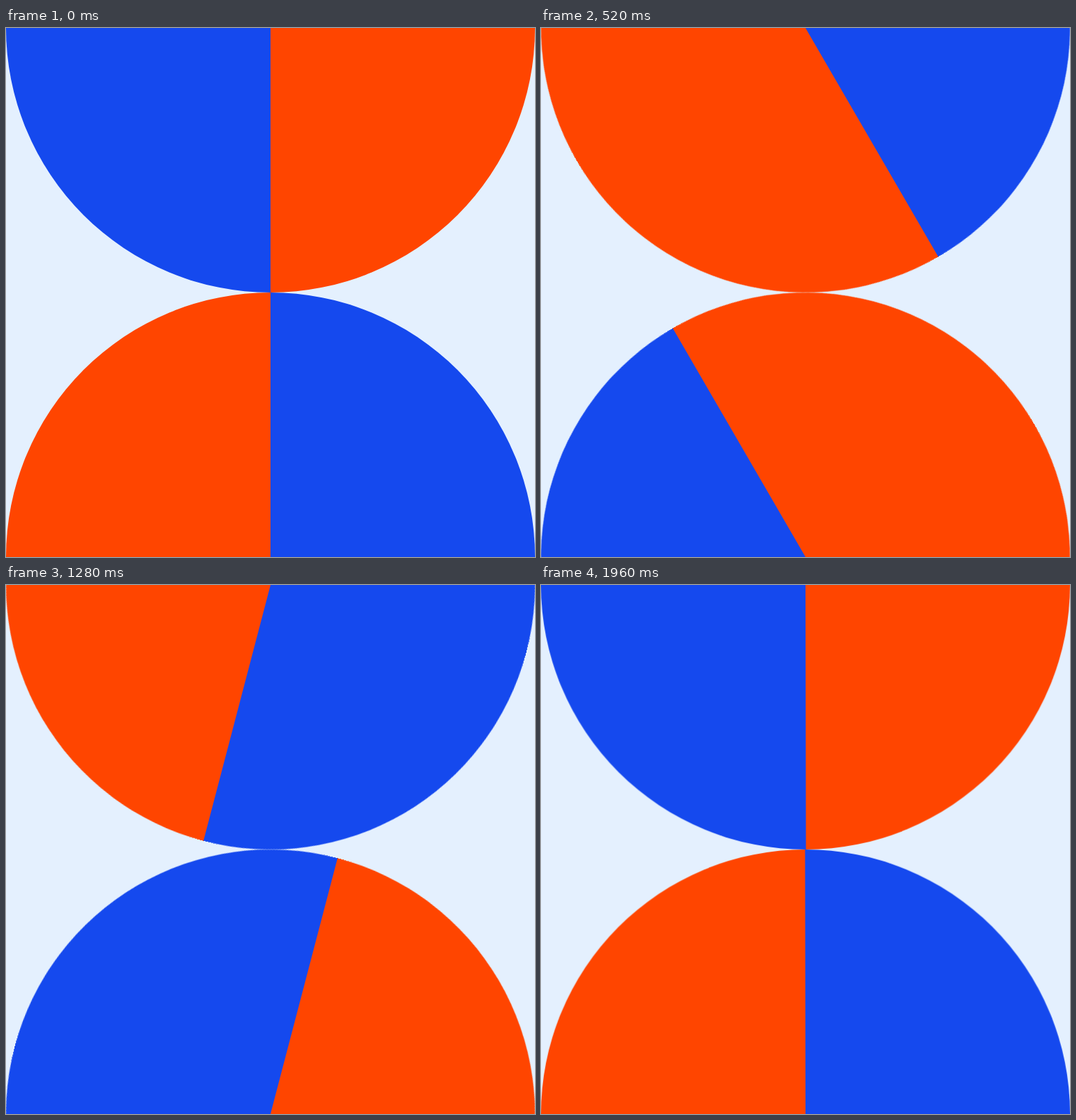
An HTML page that plays this animation: 748 px wide and 748 px high, repeating every 2 s.

```html
<!DOCTYPE html>
<html lang="en">
<head>
<meta charset="utf-8">
<title>Turning discs</title>
<style>
  html, body {
    margin: 0;
    width: 100%;
    height: 100%;
    overflow: hidden;
    background: #e4f0fe;
  }
  svg {
    display: block;
    width: 100%;
    height: 100%;
  }
  .blue { fill: #1549ee; }
  .orange { fill: #ff4500; }
  /* Two eased half turns per loop */
  .disc {
    transform-origin: 0 0;
    animation: turn 2s cubic-bezier(.77, 0, 0, 1) infinite;
  }
  @keyframes turn {
    0% { transform: rotate(0deg); }
    50% { transform: rotate(180deg); }
    100% { transform: rotate(360deg); }
  }
</style>
</head>
<body>
<svg viewBox="0 0 748 748">
  <g transform="translate(374 0)">
    <g class="disc">
      <path class="blue" d="M0-374A374 374 0 0 0 0 374Z"/>
      <path class="orange" d="M0-374A374 374 0 0 1 0 374Z"/>
    </g>
  </g>
  <g transform="translate(374 748) rotate(180)">
    <g class="disc">
      <path class="blue" d="M0-374A374 374 0 0 0 0 374Z"/>
      <path class="orange" d="M0-374A374 374 0 0 1 0 374Z"/>
    </g>
  </g>
</svg>
</body>
</html>
```
